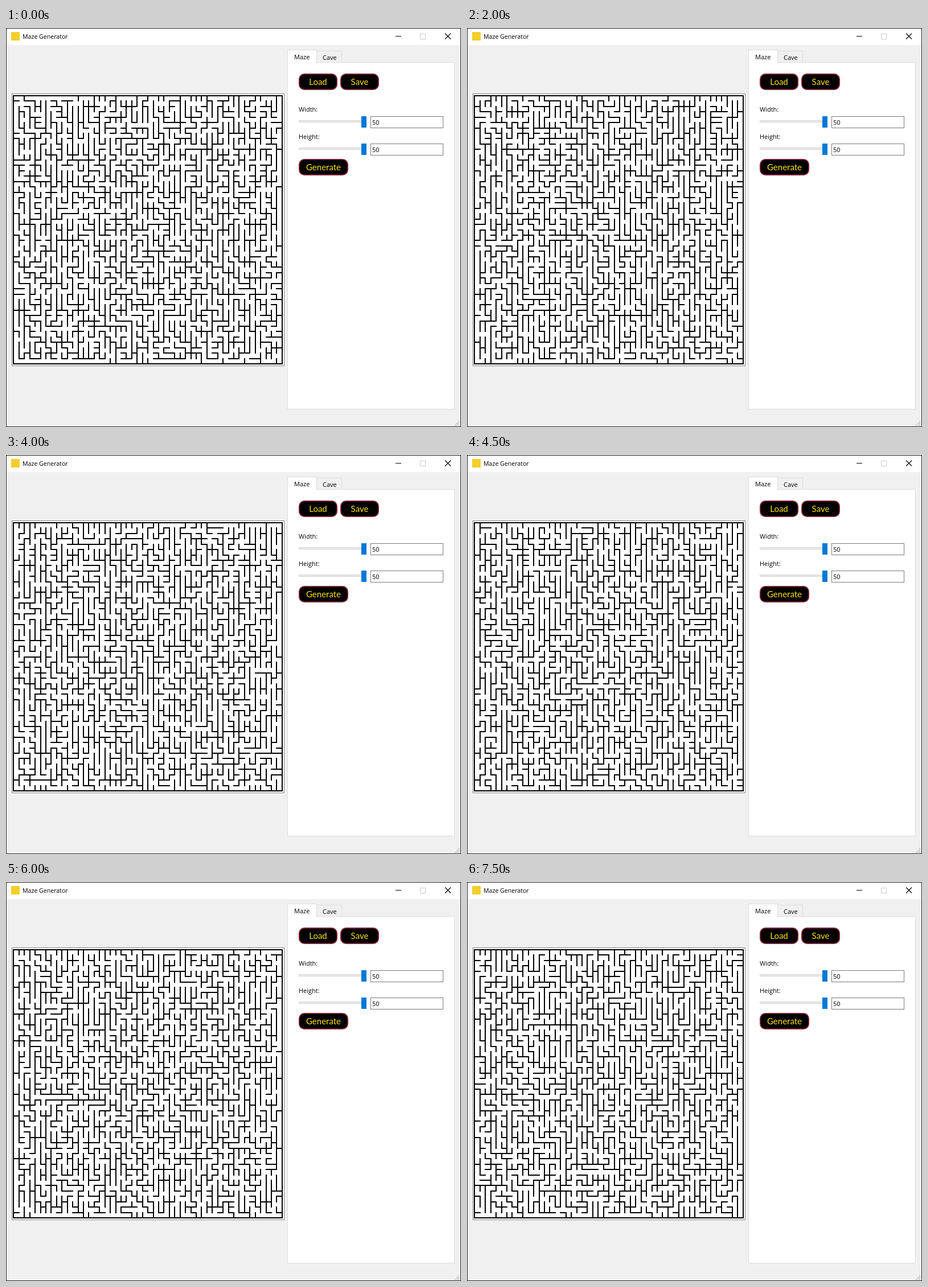
An HTML page for the animation above (8000 ms loop, 799 by 701 pixels).

```html
<!DOCTYPE html>
<html lang="en">
<head>
<meta charset="utf-8">
<title>Maze Generator</title>
<style>
  html, body { margin: 0; width: 100%; height: 100%; overflow: hidden; background: #f0f0f0; }
  svg { display: block; }
  text { font: 11px "Open Sans", "Noto Sans", sans-serif; fill: #000; }
  text.title { font-size: 10.6px; }
  text.button { font: 15px Lato, sans-serif; fill: #ffdf00; text-anchor: middle; }
  .crisp { shape-rendering: crispEdges; }
</style>
</head>
<body>
<svg id="stage" width="799" height="701" viewBox="0 0 799 701">
  <rect width="799" height="701" fill="#f0f0f0"/>
  <rect x="1" y="1" width="797" height="29" fill="#fff"/>
  <rect class="crisp" x=".5" y=".5" width="798" height="700" fill="none" stroke="#222"/>
  <rect x="9" y="7" width="15" height="15" fill="#f2cf2c"/>
  <text class="title" x="29" y="19">Maze Generator</text>
  <path d="M684 14.5h10" stroke="#000"/>
  <rect x="727.5" y="10.5" width="9" height="9" fill="none" stroke="#ccc"/>
  <path d="M771 9.5l10 10m0-10l-10 10" stroke="#000" stroke-width="1.1"/>

  <g class="crisp">
    <rect x="10.5" y="115.5" width="478" height="478" fill="#fff" stroke="#828282"/>
    <path id="walls" fill="none" stroke="#000" stroke-width="2" stroke-linecap="square"/>
    <rect x="13" y="119" width="472" height="471" fill="none" stroke="#000" stroke-width="2"/>
  </g>
  <circle id="dot" cx="480.5" cy="443.5" r="3.4" fill="#00f000"/>

  <g class="crisp" stroke="#dcdcdc">
    <rect x="494.5" y="60.5" width="293" height="609" fill="#fff"/>
    <rect x="545.5" y="40.5" width="44" height="20" fill="#f0f0f0"/>
    <path d="M494.5 61.5v-23h51v23" fill="#fff"/>
  </g>
  <text x="506" y="55">Maze</text>
  <text x="556" y="56">Cave</text>
  <g id="controls"></g>
  <path id="grip" class="crisp" fill="#bfbfbf"/>
</svg>
<script>
const CELLS = 50, STEP_MS = 500, STEPS = 16, DOT_STEP = 10;
const byId = id => document.getElementById(id);

function button(label, x, y, width) {
  return `<rect x="${x + 1}" y="${y + 1}" width="${width - 2}" height="27" rx="9" fill="#000" stroke="#7b2036" stroke-width="2"/>
    <text class="button" x="${x + width / 2}" y="${y + 20}">${label}</text>`;
}

function sizeField(label, y) {
  return `<text x="514" y="${y}">${label}</text>
    <g class="crisp">
      <rect x="514.5" y="${y + 15.5}" width="118" height="3" fill="#e7eaea" stroke="#d6d6d6"/>
      <rect x="624" y="${y + 8}" width="9" height="20" fill="#0078d7"/>
      <rect x="640.5" y="${y + 8.5}" width="127" height="20" fill="#fff" stroke="#7a7a7a"/>
    </g>
    <text x="643" y="${y + 23}">50</text>`;
}

byId("controls").innerHTML = button("Load", 514, 80, 68) + button("Save", 587, 80, 68) +
  sizeField("Width:", 147) + sizeField("Height:", 195) + button("Generate", 514, 230, 87);

let grip = "";
for (let row = 0; row < 3; row++)
  for (let col = 2 - row; col < 3; col++) grip += `M${788 + col * 3} ${691 + row * 3}h2v2h-2z`;
byId("grip").setAttribute("d", grip);

function randomFrom(seed) {
  return () => {
    seed = (seed + 0x6D2B79F5) | 0;
    let t = Math.imul(seed ^ (seed >>> 15), 1 | seed);
    t = (t + Math.imul(t ^ (t >>> 7), 61 | t)) ^ t;
    return ((t ^ (t >>> 14)) >>> 0) / 4294967296;
  };
}

// Eller's algorithm: build the maze row by row, tracking connected sets.
function mazePath(seed) {
  const random = randomFrom(seed * 7919 + 17);
  const px = col => Math.round(13.4 + col * 9.43);
  const py = row => Math.round(119 + row * 9.42);
  let nextSet = CELLS, path = "";
  let sets = Array.from({ length: CELLS }, (_, i) => i);

  for (let row = 0; row < CELLS; row++) {
    const last = row === CELLS - 1;
    for (let col = 1; col < CELLS; col++) {
      const left = sets[col - 1], right = sets[col];
      if (left !== right && (last || random() < 0.5))
        sets = sets.map(s => s === right ? left : s);
      else
        path += `M${px(col)} ${py(row)}V${py(row + 1)}`;
    }
    if (last) break;

    const groups = new Map();
    sets.forEach((s, col) => groups.set(s, [...(groups.get(s) || []), col]));
    const open = new Set();
    for (const cols of groups.values()) {
      open.add(cols[Math.floor(random() * cols.length)]);
      cols.forEach(col => random() < 0.5 && open.add(col));
    }
    sets = sets.map((s, col) => {
      if (open.has(col)) return s;
      path += `M${px(col)} ${py(row + 1)}H${px(col + 1)}`;
      return nextSet++;
    });
  }
  return path;
}

const mazes = Array.from({ length: STEPS }, (_, i) => mazePath(i + 1));
mazes[DOT_STEP + 1] = mazes[DOT_STEP];

let shown = -1;
function render(time) {
  const step = Math.floor(time / STEP_MS) % STEPS;
  if (step === shown) return;
  shown = step;
  byId("walls").setAttribute("d", mazes[step]);
  byId("dot").style.display = step === DOT_STEP ? "" : "none";
}

const start = performance.now();
function tick() {
  render(performance.now() - start);
  requestAnimationFrame(tick);
}
tick();
</script>
</body>
</html>
```
